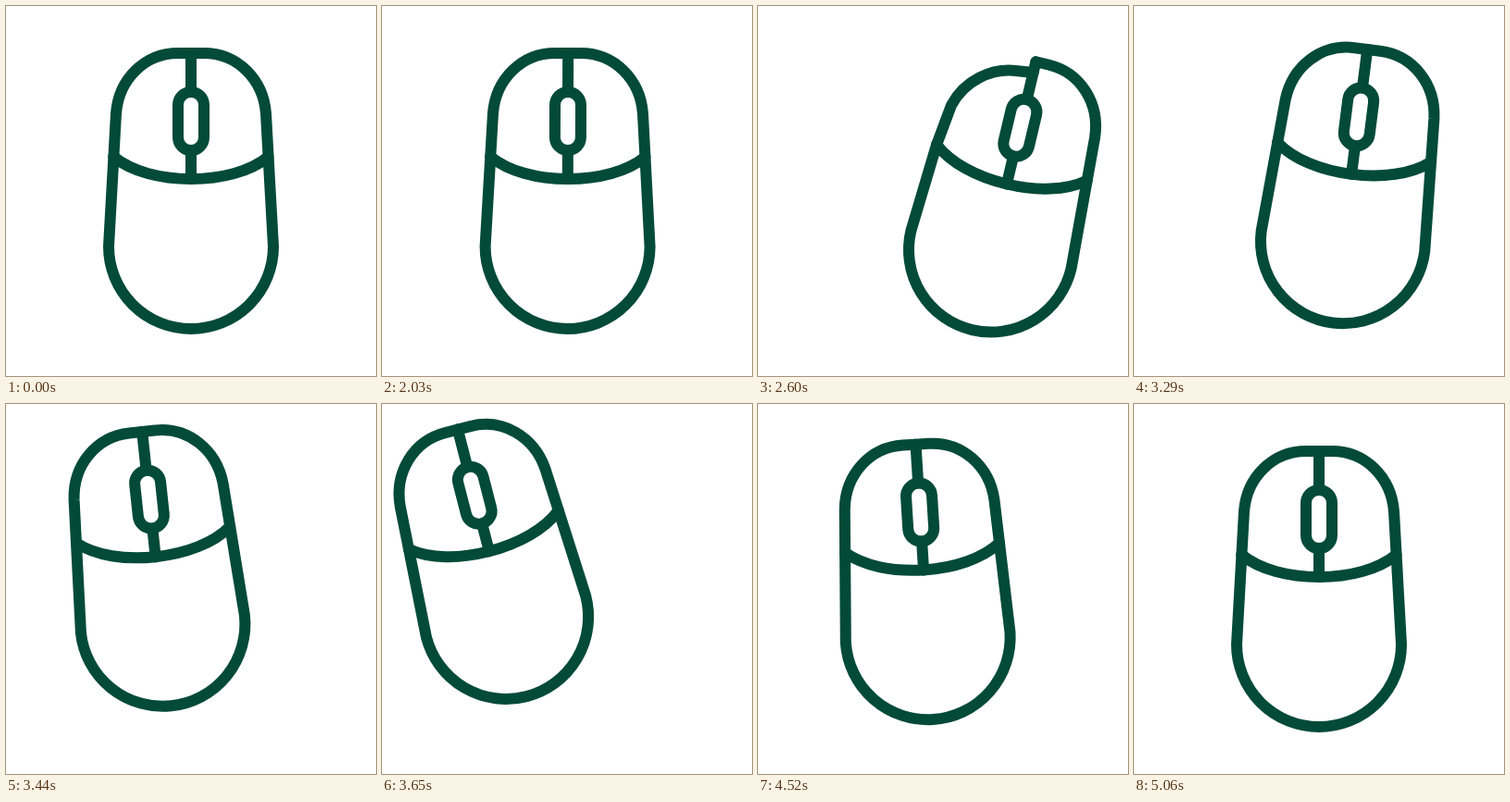
These frames come from a looping animation (400x400 px, 5.09 s). An HTML page:

```html
<!DOCTYPE html>
<html lang="en">
<head>
<meta charset="utf-8">
<title>Computer mouse</title>
<style>
  html, body { margin: 0; width: 100%; height: 100%; overflow: hidden; background: #fff; }
  svg { display: block; width: 100%; height: 100%; }
  g { fill: none; stroke: #034a39; stroke-width: 12; stroke-linecap: round; stroke-linejoin: round; }
</style>
</head>
<body>
<svg viewBox="0 0 400 400">
  <g id="mouse">
    <path d="M200 51H214C250 51 278 79 281 116L289 260A89 89 0 0 1 111 260L116.4 163"/>
    <path d="M116.4 163C136 179 167 187 200 187S264 179 283.6 163"/>
    <path d="M200 51V93M200 156V187"/>
    <rect x="186" y="93" width="28" height="63" rx="14"/>
    <path id="button"/>
  </g>
</svg>
<script>
const LOOP = 5090, STEP = 30, CLICK = 180;
const mouse = document.getElementById('mouse');
const button = document.getElementById('button');

// Poses: x and y of the mouse's bottom end, tilt in degrees
const home = [200, 350, 0], right = [231.1, 351.1, 13.4], left = [153.4, 315.6, -15.7];
const moves = [
  { start: 2000, end: 2510, from: home, to: right },
  { start: 3140, end: 3800, from: right, to: left },
  { start: 4220, end: 4790, from: left, to: home }
];
const clicks = [2600, 2870, 3890, 4880];

// Left button outline, released and pressed
const up = [119, 116, 122, 79, 150, 51, 186, 51, 200, 51];
const down = [122, 118, 130, 88, 155, 69, 181, 65.5, 200, 63];

const mix = (a, b, p) => a.map((v, i) => v + (b[i] - v) * p);
const bezier = (a, b, s) => 3 * (1 - s) * s * ((1 - s) * a + s * b) + s ** 3;

// cubic-bezier(.33, 0, .3, 1)
function ease(x) {
  let lo = 0, hi = 1;
  for (let i = 0; i < 24; i++) {
    const mid = (lo + hi) / 2;
    if (bezier(.33, .3, mid) < x) lo = mid; else hi = mid;
  }
  return bezier(0, 1, hi);
}

function pose(t) {
  const m = moves.filter(m => t >= m.start).pop();
  if (!m) return home;
  return mix(m.from, m.to, ease(Math.min(1, (t - m.start) / (m.end - m.start))));
}

// Snaps down, then eases back up
function press(t) {
  const start = clicks.find(c => t >= c && t < c + CLICK);
  if (start === undefined) return 0;
  const p = (t - start) / CLICK;
  return 1 - p * p * (3 - 2 * p);
}

function draw(now) {
  const t = Math.floor((now % LOOP + 10) / STEP) * STEP - 10;
  const [x, y, tilt] = pose(t);
  mouse.setAttribute('transform', `translate(${x} ${y}) rotate(${tilt}) translate(-200 -350)`);
  const b = mix(up, down, press(t));
  button.setAttribute('d', `M116.4 163L${b.slice(0, 2)}C${b.slice(2, 8)}L${b.slice(8)}`);
}

let begin;
function tick(now) {
  begin ??= now;
  draw(now - begin);
  requestAnimationFrame(tick);
}
draw(0);
requestAnimationFrame(tick);
</script>
</body>
</html>
```
